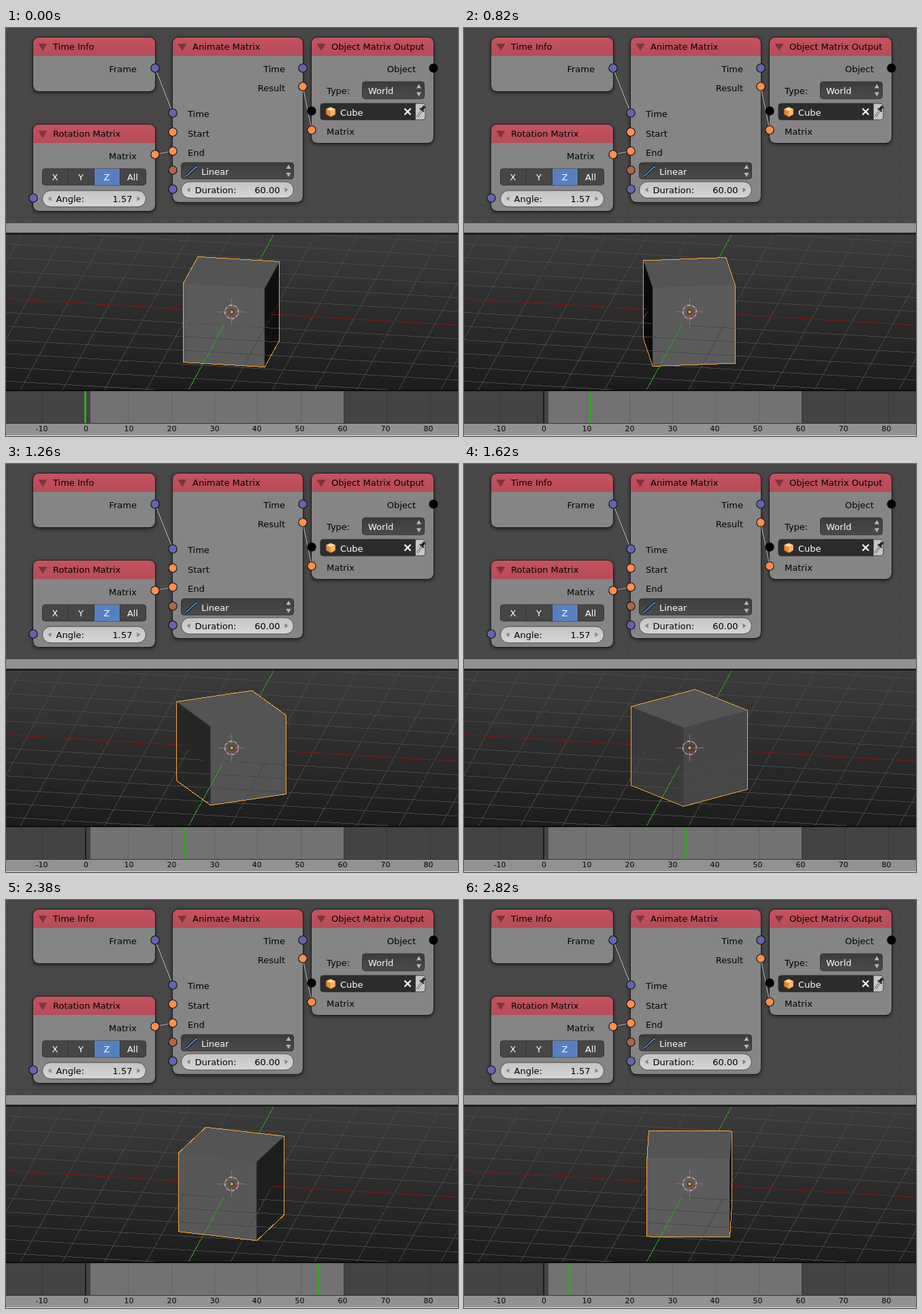
These frames come from a looping animation (664 px wide and 600 px high, 2860 ms). An HTML page:

```html
<!DOCTYPE html>
<html lang="en">
<head>
<meta charset="utf-8">
<title>Animate Matrix</title>
<style>
  html, body { margin: 0; width: 100%; height: 100%; overflow: hidden; background: #484848; }
  svg { display: block; }
  text { font: 13px "DejaVu Sans", sans-serif; }
  .ruler { font-size: 11px; text-anchor: middle; }
  .crisp { shape-rendering: crispEdges; }
</style>
</head>
<body>
<svg id="stage" width="664" height="600" viewBox="0 0 664 600">
  <defs>
    <linearGradient id="sky" x2="0" y2="1"><stop stop-color="#3c3c3c"/><stop offset="1" stop-color="#1c1c1c"/></linearGradient>
    <linearGradient id="menu" x2="0" y2="1"><stop stop-color="#3c3c3c"/><stop offset="1" stop-color="#4b4b4b"/></linearGradient>
    <linearGradient id="field" x2="0" y2="1"><stop stop-color="#c4c4c4"/><stop offset="1" stop-color="#d6d6d6"/></linearGradient>
    <linearGradient id="header" x2="0" y2="1"><stop stop-color="#c4535f"/><stop offset="1" stop-color="#b64b57"/></linearGradient>
    <clipPath id="view"><rect y="304" width="664" height="228"/></clipPath>
    <filter id="blur" x="-10%" y="-10%" width="120%" height="120%"><feGaussianBlur stdDeviation="2.5"/></filter>
  </defs>
  <g id="nodes"></g>
  <g id="viewport" clip-path="url(#view)">
    <rect y="304" width="664" height="229" fill="url(#sky)"/>
    <g id="cube"></g>
    <g id="floor" class="crisp"></g>
    <g id="upper"></g>
    <path id="outline" class="crisp" fill="none" stroke="#ffa332"/>
    <g id="cursor"></g>
  </g>
  <g id="timeline" class="crisp"></g>
  <rect id="marker" class="crisp" y="534" width="2.6" height="47" fill="#33a722"/>
</svg>
<script>
const $ = id => document.getElementById(id);

// ---- drawing helpers ----
const rect = (x, y, w, h, fill, extra = "") =>
  `<rect x="${x}" y="${y}" width="${w}" height="${h}" fill="${fill}" ${extra}/>`;
const path = (d, fill, extra = "") => `<path d="${d}" fill="${fill}" ${extra}/>`;
const line = (x1, y1, x2, y2, color, width = 1) =>
  path(`M${x1} ${y1}L${x2} ${y2}`, "none", `stroke="${color}" stroke-width="${width}"`);
const text = (x, y, value, anchor = "start", fill = "#000") =>
  `<text x="${x}" y="${y}" text-anchor="${anchor}" fill="${fill}">${value}</text>`;
const polygon = (points, fill) =>
  `<polygon points="${points.map(p => p.join()).join(" ")}" fill="${fill}" stroke="${fill}" stroke-width=".4"/>`;

// ---- node editor ----
const BLUE = "#6464b4", ORANGE = "#ff8f4a", BROWN = "#ab6549", BLACK = "#000";

function node(x, y, w, h, title) {
  return rect(x - 1, y + 1, w + 2, h + 2, "#000", 'rx="9" opacity=".5" filter="url(#blur)"') +
    rect(x, y, w, h, "#858585", 'rx="8"') +
    path(`M${x} ${y + 27}v-19q0-8 8-8h${w - 16}q8 0 8 8v19z`, "url(#header)") +
    rect(x - 0.5, y - 0.5, w + 1, h + 1, "none", 'rx="8.5" stroke="#1e1e1e"') +
    path(`M${x + 7.5} ${y + 9}h13l-6.5 11z`, "#7f333b") +
    text(x + 29, y + 18, title);
}
const socket = (x, y, color) =>
  `<circle cx="${x}" cy="${y}" r="6.2" fill="${color}" stroke="#0c0c0c" stroke-width="1.1"/>`;
const link = (x1, y1, x2, y2) =>
  line(x1, y1, x2, y2, "#333", 2.4) + line(x1, y1, x2, y2, "#bcbcbc", 1.1);
const menu = (x, y, w, h) => rect(x, y, w, h, "url(#menu)", 'rx="4" stroke="#303030"');
const menuArrows = (x, y) =>
  path(`M${x - 3.5} ${y - 3}h7l-3.5-6zM${x - 3.5} ${y + 3}h7l-3.5 6z`, "#b9b9b9");

function numberField(x, y, w, label, value) {
  const mid = y + 12;
  return rect(x, y, w, 24, "url(#field)", 'rx="12" stroke="#4a4a4a"') +
    path(`M${x + 8} ${mid}l5-3.5v7zM${x + w - 8} ${mid}l-5-3.5v7z`, "#858585") +
    text(x + 20, mid + 5, label) + text(x + w - 20, mid + 5, value, "end");
}

function buttonRow(x, y) {
  const labels = ["X", "Y", "Z", "All"], w = 38;
  return rect(x, y, w * 4, 24, "#464646", 'rx="4" stroke="#303030"') +
    rect(x + w * 2, y, w, 24, "#5680c2") +
    [1, 2, 3].map(i => line(x + w * i, y, x + w * i, y + 24, "#343434")).join("") +
    labels.map((s, i) => text(x + w * (i + 0.5) - 0.5, y + 17, s, "middle", "#fff")).join("");
}

function buildNodes() {
  let grid = "";
  for (let x = 15.5; x < 664; x += 25) grid += line(x, 0, x, 287, "#444");
  for (let y = 11.5; y < 287; y += 25) grid += line(0, y, 664, y, "#444");

  const cubeIcon =
    path("M477 116l7 3v8l-7 4l-7-4v-8z", "#e88b2e", 'stroke="#5c3512" stroke-width=".8"') +
    path("M477 116.5l6.5 2.7l-6.5 3l-6.5-3z", "#ffd9a6") +
    path("M477 122.5l6.5-3v7.4l-6.5 3.6z", "#f8b66c");
  const dropper = path("M601 111h10q5 0 5 5v14q0 5-5 5h-10z", "#c6c6c6", 'stroke="#444"') +
    line(604, 131, 611, 121, "#555", 3) + line(604, 131, 611, 121, "#f2f2f2", 1.2) +
    line(608, 118, 614, 123, "#222", 2) + line(611, 120, 615, 115, "#222", 4);
  const curve = (color, width) =>
    path("M264 218c4-1 12-13 17-14", "none", `stroke="${color}" stroke-width="${width}"`);

  $("nodes").innerHTML = rect(0, 0, 664, 288, "#484848") + grid +
    node(40, 14, 179, 79, "Time Info") +
    text(192, 65, "Frame", "end") +

    node(40, 142, 179, 127, "Rotation Matrix") +
    text(192, 193, "Matrix", "end") +
    buttonRow(53.5, 207) + numberField(53.5, 239, 152, "Angle:", "1.57") +

    node(245, 14, 191, 242, "Animate Matrix") +
    text(410, 65, "Time", "end") + text(410, 93, "Result", "end") +
    text(267, 131, "Time") + text(267, 160, "Start") + text(267, 188, "End") +
    menu(257.5, 198, 165, 24) + curve("#111", 4) + curve("#5f8fd0", 1.8) +
    text(287, 216, "Linear", "start", "#fff") + menuArrows(415, 210) +
    numberField(257.5, 226, 165, "Duration:", "60.00") +

    node(449, 14, 179, 155, "Object Matrix Output") +
    text(602, 65, "Object", "end") + text(471, 97, "Type:") +
    menu(523.5, 79, 91, 25) + text(532, 97, "World", "start", "#fff") + menuArrows(606.5, 91.5) +
    dropper + path("M601 111h-135q-4 0-4 4v16q0 4 4 4h135z", "#2c2c2c", 'stroke="#262626"') +
    cubeIcon + text(491, 129, "Cube", "start", "#fff") +
    line(585.5, 118.5, 594.5, 127.5, "#fff", 2.2) + line(594.5, 118.5, 585.5, 127.5, "#fff", 2.2) +
    text(471, 157, "Matrix") +

    link(219, 59, 245, 125) + link(219, 186, 245, 181) + link(436, 86, 449, 150) +
    [[219, 59, BLUE], [219, 186, ORANGE], [40, 250, BLUE], [245, 125, BLUE], [245, 153, ORANGE],
     [245, 181, ORANGE], [245, 209, BROWN], [245, 237, BLUE], [436, 59, BLUE], [436, 86, ORANGE],
     [628, 59, BLACK], [449, 122, BLACK], [449, 150, ORANGE]].map(s => socket(...s)).join("") +

    rect(0, 287, 664, 17, "#1f1f1f") + rect(0, 287, 664, 14, "#929292");
}

// ---- 3D view: orthographic, seen from above ----
const CENTER = [331, 417.5], UNIT = 60.8, YAW = 0.1772, SIN_PITCH = 0.327, HALF = 58;

function project(x, y) {
  const right = x * Math.cos(YAW) + y * Math.sin(YAW);
  const depth = y * Math.cos(YAW) - x * Math.sin(YAW);
  return [CENTER[0] + UNIT * right, CENTER[1] - UNIT * depth * SIN_PITCH];
}
const lift = ([x, y], z) => [x, y - z];

function buildFloor() {
  const N = 16;
  const along = (i, color) => line(...project(-N, i), ...project(N, i), color);
  const across = (i, color) => line(...project(i, -N), ...project(i, N), color);
  let lines = "";
  for (let i = -N; i <= N; i++) if (i) lines += along(i, "#484848") + across(i, "#484848");
  $("floor").innerHTML = lines + along(0, "#8c1414") + across(0, "#31a325");
}

function buildCursor() {
  const [x, y] = [331.5, 417.5];
  const ring = (color, dash) =>
    `<circle cx="${x}" cy="${y}" r="10" fill="none" stroke="${color}" ${dash}/>`;
  const arms = [[1, 0], [-1, 0], [0, 1], [0, -1]].map(([dx, dy]) =>
    line(x + dx * 6, y + dy * 6, x + dx * 20, y + dy * 20, "#7c7c7c")).join("");
  $("cursor").innerHTML =
    `<circle cx="${x}" cy="${y}" r="3" fill="#e8923a" stroke="#111"/>` +
    arms + ring("#fff", "") + ring("#f01818", 'stroke-dasharray="3.927"');
}

function solid({ left, front, right, back }, low) {
  const side = (a, b) => {
    const v = Math.round(92 * (b[0] - a[0]) / (2 * UNIT));
    return polygon([lift(a, HALF), lift(b, HALF), lift(b, low), lift(a, low)], `rgb(${v},${v},${v})`);
  };
  return side(left, front) + side(front, right) +
    polygon([left, back, right, front].map(p => lift(p, HALF)), "#545454");
}

function drawCube(angle) {
  const corners = [0, 1, 2, 3].map(k => {
    const a = angle + Math.PI * (k / 2 + 0.25);
    return project(Math.SQRT2 * Math.cos(a), Math.SQRT2 * Math.sin(a));
  }).sort((a, b) => a[0] - b[0]);
  const [left, m, n, right] = corners;
  const [back, front] = m[1] < n[1] ? [m, n] : [n, m];
  const foot = { left, front, right, back };

  // The floor cuts the cube in half: it covers the lower part, the upper part covers it.
  $("cube").innerHTML = solid(foot, -HALF);
  $("upper").innerHTML = solid(foot, 0);
  const rim = [left, back, right].map(p => lift(p, HALF))
    .concat([right, front, left].map(p => lift(p, -HALF)));
  $("outline").setAttribute("d", "M" + rim.map(p => p.join(" ")).join("L") + "Z");
}

// ---- timeline ----
const frameX = frame => 116.5 + 19 / 3 * frame;

function buildTimeline() {
  let out = rect(0, 532, 664, 2, "#0c0c0c") + rect(0, 534, 664, 48, "#434343") +
    rect(124, 534, 372.5, 48, "#727272") + rect(0, 581, 664, 1, "#333") +
    rect(0, 582, 664, 18, "#929292") + rect(0, 599, 664, 1, "#e0e0e0");
  for (let f = -10; f <= 80; f += 10) {
    const color = f === 0 ? "#1e1e1e" : f > 0 && f < 60 ? "#646464" : "#383838";
    const labelX = f < 0 ? 52.5 : Math.round(117 + 6.285 * f) + 0.5;
    out += line(frameX(f), 534, frameX(f), 581, color, f ? 1 : 2) +
      `<text class="ruler" x="${labelX}" y="593">${f}</text>`;
  }
  $("timeline").innerHTML = out;
}

// ---- playback ----
const LOOP = 2860, HOLD = 500, STEP = 40;

// Playback runs slightly faster than the screen steps: one frame is skipped every 11 steps.
function frameAt(ms) {
  if (ms < HOLD) return 0;
  const step = Math.floor((ms - HOLD) / STEP) + 1;
  const frame = step + 1 + Math.floor((step + 9) / 11);
  return frame > 60 ? frame - 60 : frame;
}

let shown = -1;
function render(ms) {
  const frame = frameAt(ms % LOOP);
  if (frame === shown) return;
  shown = frame;
  drawCube(frame / 60 * Math.PI / 2);
  $("marker").setAttribute("x", frameX(frame) - 1.3);
}

buildNodes();
buildFloor();
buildCursor();
buildTimeline();
const start = performance.now();
function tick() {
  render(performance.now() - start);
  requestAnimationFrame(tick);
}
tick();
</script>
</body>
</html>
```
